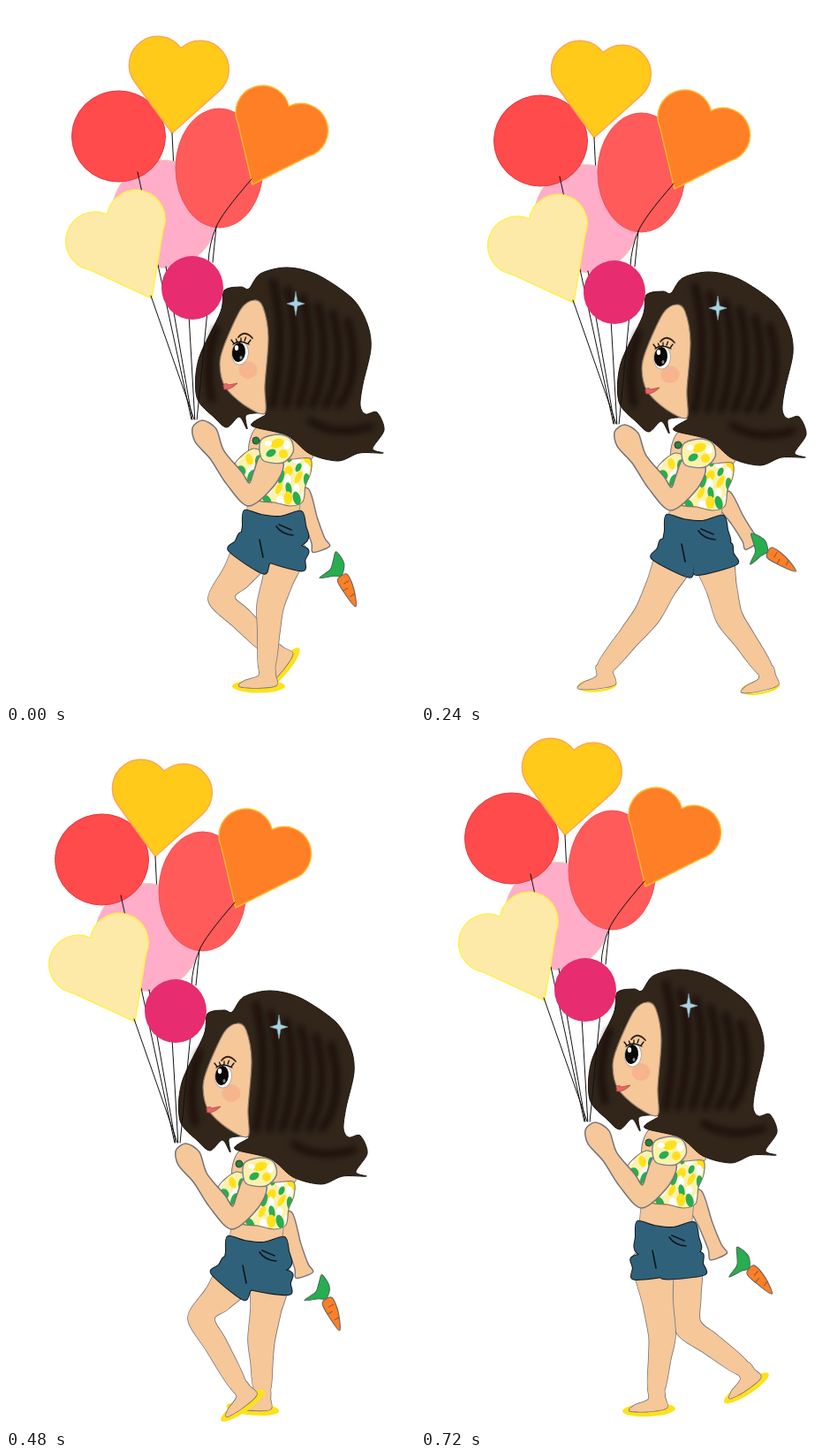
Write an HTML page that moves like this. It is 463 px wide and 789 px high and loops after 840 ms.

```html
<!DOCTYPE html>
<html lang="en">
<head>
<meta charset="utf-8">
<title>Girl walking with balloons</title>
<style>
html, body { margin: 0; width: 100%; height: 100%; overflow: hidden; background: #fff; }
svg { display: block; width: 463px; height: 789px; }
path, ellipse { stroke-linejoin: round; stroke-linecap: round; }
</style>
</head>
<body>
<svg viewBox="0 0 463 789">
  <defs>
    <filter id="soft" x="-20%" y="-20%" width="140%" height="140%"><feGaussianBlur stdDeviation="3"/></filter>
    <clipPath id="floor"><path d="M0 0H463V786H0Z"/></clipPath>
    <clipPath id="cloth"><path id="clothShape"/></clipPath>
  </defs>
  <g id="walk" clip-path="url(#floor)"></g>
</svg>
<script>
const STEP = 120;
const SKIN = '#f5c799', DENIM = '#30617b', GREEN = '#27ae50', YELLOW = '#ffe11a', CREAM = '#fcf2ae', INK = '#74747a';

// Smooth closed outline through [x, y] points
function smooth(p, k = 0.15) {
  const n = p.length, at = i => p[(i + n) % n];
  const lean = (a, b, c, s) => [0, 1].map(j => (a[j] + (c[j] - b[j]) * k * s).toFixed(1));
  return p.reduce((d, a, i) => {
    const next = at(i + 1);
    return d + `C${lean(a, at(i - 1), next, 1)} ${lean(next, a, at(i + 2), -1)} ${next}`;
  }, 'M' + p[0]) + 'Z';
}
const points = text => text.split(' ').map(s => s.split(',').map(Number));

// Outline of a tapering limb through joints [x, y, half width]
function limb(joints) {
  const side = s => joints.map(([x, y, w], i) => {
    const a = joints[Math.max(i - 1, 0)], b = joints[Math.min(i + 1, joints.length - 1)];
    const dx = b[0] - a[0], dy = b[1] - a[1], len = Math.hypot(dx, dy);
    return [x - dy / len * w * s, y + dx / len * w * s];
  });
  return smooth([...side(1), ...side(-1).reverse()]);
}

const path = (d, fill, ink = 'none', w = 1) => `<path d="${d}" fill="${fill}" stroke="${ink}" stroke-width="${w}"/>`;
const line = (d, ink, w) => path(d, 'none', ink, w);
const blob = (text, fill, ink, w) => path(smooth(points(text)), fill, ink, w);
const oval = (x, y, rx, ry, fill, ink = 'none', turn = 0, w = 1) =>
  `<ellipse cx="${x}" cy="${y}" rx="${rx}" ry="${ry}" fill="${fill}" stroke="${ink}" stroke-width="${w}" transform="rotate(${turn} ${x} ${y})"/>`;
const place = (x, y, turn, art) => `<g transform="translate(${x} ${y}) rotate(${turn})">${art}</g>`;
const mix = (a, b, t) => a.map((v, i) => v + (b[i] - v) * t);

// Several shapes sharing one outer outline; each draws itself with (fill, ink, width)
const union = (parts, fill, ink, w) =>
  parts.map(draw => draw(fill, ink, w * 2)).join('') + parts.map(draw => draw(fill)).join('');

function random(seed) {
  return () => (seed = seed * 16807 % 2147483647) / 2147483647;
}

// Two round lobes joined by tangents to a tip
function heart(x, y, turn, half, deep, r, fill, ink) {
  const far = Math.hypot(half, deep), a = Math.atan2(half, deep) + Math.asin(r / far), len = Math.sqrt(far * far - r * r);
  const tx = Math.sin(a) * len, ty = -Math.cos(a) * len, notch = -deep - Math.sqrt(r * r - half * half);
  const large = +(half * (ty - notch) < tx * (-deep - notch));
  return place(x, y, turn, path(`M0 0L${-tx} ${ty}A${r} ${r} 0 ${large} 1 0 ${notch}A${r} ${r} 0 ${large} 1 ${tx} ${ty}Z`, fill, ink, 1.5));
}

function balloons() {
  const hand = [213, 468];
  const strings = [[172, 293], [181, 295], [207, 350], [228, 345]].map(p => `M${p}L${hand[0] + (p[0] - 200) / 9} ${hand[1]}`).join('');
  return oval(179.5, 235.5, 60, 61, '#ffadc9', '#e6cfb5') +
    oval(127.5, 147.5, 53, 51.5, '#ff4b4b', '#e33a40') +
    oval(241.5, 183.5, 49.5, 67.5, '#ff5b5b', '#f45054') +
    heart(188, 144, 6, 24, 75, 32.5, '#ffca1a', '#ffa653') +
    heart(279, 202, 25, 20, 74.5, 30.5, '#ff7f27', '#ffb62c') +
    line(`M188 144L189.5 175M149 188L155.5 218M278 196Q244 235 238 250L234 290M238 250Q230 268 229 290${strings}`, '#111', 1) +
    heart(165, 331, -28, 21, 82, 33, '#fdeaa8', '#fff04a') +
    line(`M164 328L${hand}`, '#111', 1) +
    oval(211, 319, 35, 36, '#e72c70');
}

const blouse = smooth(points('259,521 266,510 280,501 293,505 318,513 344,512 345,528 339,543 336,561 322,566 304,562 284,559 274,538'));
document.getElementById('clothShape').setAttribute('d', blouse);

function torso() {
  const rnd = random(11);
  let print = '';
  for (let i = 0; i < 40; i++) {
    const x = 262 + i % 8 * 11 + rnd() * 6, y = 510 + (i >> 3) * 11 + rnd() * 6;
    print += oval(x, y, 3 + rnd() * 2, 5 + rnd() * 3, ['#fff', YELLOW, GREEN][i % 3], 'none', rnd() * 80 - 40);
  }
  return blob('285,476 330,485 344,500 344,514 300,520 275,508', SKIN, INK) +
    path(blouse, CREAM) + `<g clip-path="url(#cloth)">${print}</g>` + line(blouse, '#7b7460', 1.1) +
    oval(283, 492, 4, 4, '#23853f', '#333');
}

function hair() {
  const outline = '247,322 266,318 275,320 288,303 318,296 352,304 392,331 409,360 413,388 404,428 401,452 407,462 420,460 ' +
    '428,480 415,501 427,506 400,506 376,515 344,507 318,486 278,475 294,462 272,463 273,479 264,465 250,477 236,466 216,443 218,400 243,346';
  let strands = 'M238 366Q224 402 233 445M345 470Q372 488 412 476';
  for (let i = 0; i < 6; i++) {
    const x = 302 + i * 17, top = 312 + i * 9;
    strands += `M${x} ${top}Q${x + 16} ${top + 60} ${x - i * 2} 452`;
  }
  return blob(outline, '#32261b', '#1a130d') + `<g filter="url(#soft)" opacity=".6">${line(strands, '#090604', 8)}</g>`;
}

function face() {
  const ray = (a, r) => [328 + Math.sin(a) * r * 0.75, 337 - Math.cos(a) * r];
  let star = '', lashes = 'M257 383Q264 377 275 383';
  for (let i = 0; i < 8; i++) star += (i ? 'L' : 'M') + ray(i * Math.PI / 4, i % 2 ? 3.6 : 13.5);
  for (let i = 0; i < 5; i++) lashes += `M${258 + i * 4} ${382 - i % 4}l${i * 1.5 - 3} -4`;
  return blob('281,333 291,341 297,375 293,430 293,461 270,452 248,431 242,406 247,384 266,343', SKIN, '#8d7a6a', 1.2) +
    oval(274, 412, 10.5, 10, '#f6b58e') +
    oval(265, 393, 9.5, 13, '#fff', '#b9a995', 6) + oval(263.5, 392, 7.5, 11, '#0b0908', 'none', 6) +
    oval(261, 387, 2.2, 3, '#fff') + oval(266, 398, 1.5, 2, '#888') +
    line(lashes, '#111', 1.3) + line('M263 375Q270 366 279 376', '#35241a', 1.8) +
    path('M246 429Q249 426 252 429L262 427Q254 435 247 434Z', '#e46a66', '#b9403f', .8) +
    path(star + 'Z', '#a9d3e2', '#7fa3b1', .6);
}

function arm() {
  const shape = limb([[217, 473, 7], [226, 486, 14], [239, 508, 9], [258, 534, 11], [275, 553, 13], [292, 535, 14], [302, 512, 13]]);
  return path(shape, SKIN, INK, 1.5) +
    blob('287,503 290,490 308,485 322,490 325,505 313,517 292,515', CREAM, '#7d7d88', 1.4) +
    oval(307, 495, 8, 5, YELLOW, 'none', -20) + oval(300, 506, 6, 4, GREEN, 'none', -30) +
    oval(314, 507, 5, 5, YELLOW) + oval(297, 495, 4, 3, '#fff') + oval(318, 497, 4, 5, '#fff');
}

const upper = torso() + hair() + face() + balloons() + arm();

const hipOf = (stance, side) => [303 + side * 17, stance.hip + 34];

const footShape = smooth(points('-8,-4 -9,8 -25,14 -31,20 -12,22 11,19 10,7 8,-4'));

function leg(stance, [side, knee, ankle, tilt]) {
  const calf = mix(knee, ankle, 0.4);
  const shape = limb([[...hipOf(stance, side), 21], [...mix(hipOf(stance, side), knee, .6), 17], [...knee, 15], [...calf, 12.5], [...ankle, 8.5]]);
  const sandal = stance.thin ? oval(-9, 18, 21, 6.5, 'none', YELLOW, 0, 2.6) : oval(-9, 20, 30, 7.5, YELLOW);
  return place(...ankle, tilt, sandal) + union([
    (...ink) => place(...ankle, tilt, path(footShape, ...ink)),
    (...ink) => path(shape, ...ink)
  ], SKIN, INK, .8);
}

function shorts(stance) {
  const seat = smooth(points('-33,-3 -14,2 8,4 31,-2 36,14 37,32 0,50 -34,32 -35,14').map(([x, y]) => [x + 303, y + stance.hip]));
  const cuffs = stance.legs.map(([side, knee]) => {
    const top = hipOf(stance, side), t = 26 / Math.hypot(knee[0] - top[0], knee[1] - top[1]);
    return limb([[...top, 21], [...mix(top, knee, t / 2), 23], [...mix(top, knee, t), 23]]);
  });
  const pocket = 'M306 15Q312 24 325 25M309 13L323 19M291 50L287 30';
  return union([seat, ...cuffs].map(d => (...ink) => path(d, ...ink)), DENIM, '#10191f', 1) +
    `<g transform="translate(0 ${stance.hip})">${line(pocket, '#10191f', 1.7)}</g>`;
}

function carrot(x, y, turn) {
  return place(x, y, turn,
    blob('-28,-4 -12,-7 -1,1 -4,10 -8,25 -12,10 -20,3', GREEN, '#4c6653') +
    blob('0,-5 2,7 17,6 38,0 18,-6', '#ff7f27', '#6f6962', 1.2) +
    line('M8 -4L9 2M16 6L15 0M24 -4L25 1', '#8b5a35', 1));
}

function lower(stance) {
  const { hip, hand } = stance;
  const sleeve = limb([[333, 550, 10], [...mix([333, 550], hand, .5), 8], [...mix([333, 550], hand, .85), 8], [...hand, 10]]);
  return path(sleeve, SKIN, INK, 1.4) + carrot(...stance.carrot) +
    stance.legs.map(l => leg(stance, l)).join('') +
    path(`M276 550H335L331 ${hip + 4}H272Z`, SKIN, '#9a8d83') + shorts(stance);
}

// Legs are [side, knee, ankle, foot tilt], the rear one first
const pass = { hip: 574, hand: [357, 615], carrot: [381, 645, 67], legs: [[-1, [244, 671], [303, 730], -50], [1, [299, 680], [295, 750], 0]] };
const step = { hip: 583, hand: [378, 608], carrot: [406, 626, 38], legs: [[-1, [252, 695], [246, 760], 0], [1, [334, 695], [353, 760], -10]], scribble: true };
const stride = { hip: 574, hand: [368, 605], carrot: [386, 612, 37], legs: [[-1, [248, 684], [199, 745], -5], [1, [341, 687], [382, 747], -10]], thin: true };
const lift = { hip: 580, hand: [358, 620], carrot: [383, 645, 82], legs: [[-1, [282, 692], [276, 757], -5], [1, [290, 680], [374, 729], -33]] };
const cross = { hip: 577, hand: [357, 618], carrot: [383, 645, 69], legs: [[1, [308, 692], [309, 750], 5], [-1, [240, 667], [283, 744], -35]] };
const trail = { hip: 584, hand: [362, 621], carrot: [398, 634, 50], legs: [[1, [328, 701], [390, 748], -33], [-1, [298, 711], [291, 774], -3]] };

const poses = [[0, 0, pass], [-1, -10, step], [8, 5, stride], [-14, -7, lift], [-19, -2, cross], [-3, 5, stride], [-25, -26, trail]];

// Dark pen strokes over the hair
function scribble() {
  let d = '';
  for (let i = 0; i < 4; i++) d += `M${357 + i * 12} 403L${356 + i * 10} ${458 - i * 6}`;
  return line(d, '#0b0705', 7);
}

const walk = document.getElementById('walk');
walk.innerHTML = poses.map(([x, y, stance]) =>
  `<g>${place(x, y, 0, lower(stance) + upper + (stance.scribble ? scribble() : ''))}</g>`).join('');

const cycle = [...poses.keys(), 0];
const start = document.timeline.currentTime || 0;
poses.forEach((_, i) => {
  const frames = cycle.map(k => ({ opacity: +(k === i), easing: 'steps(1, end)' }));
  walk.children[i].animate(frames, { duration: STEP * poses.length, iterations: Infinity }).startTime = start;
});
</script>
</body>
</html>
```
